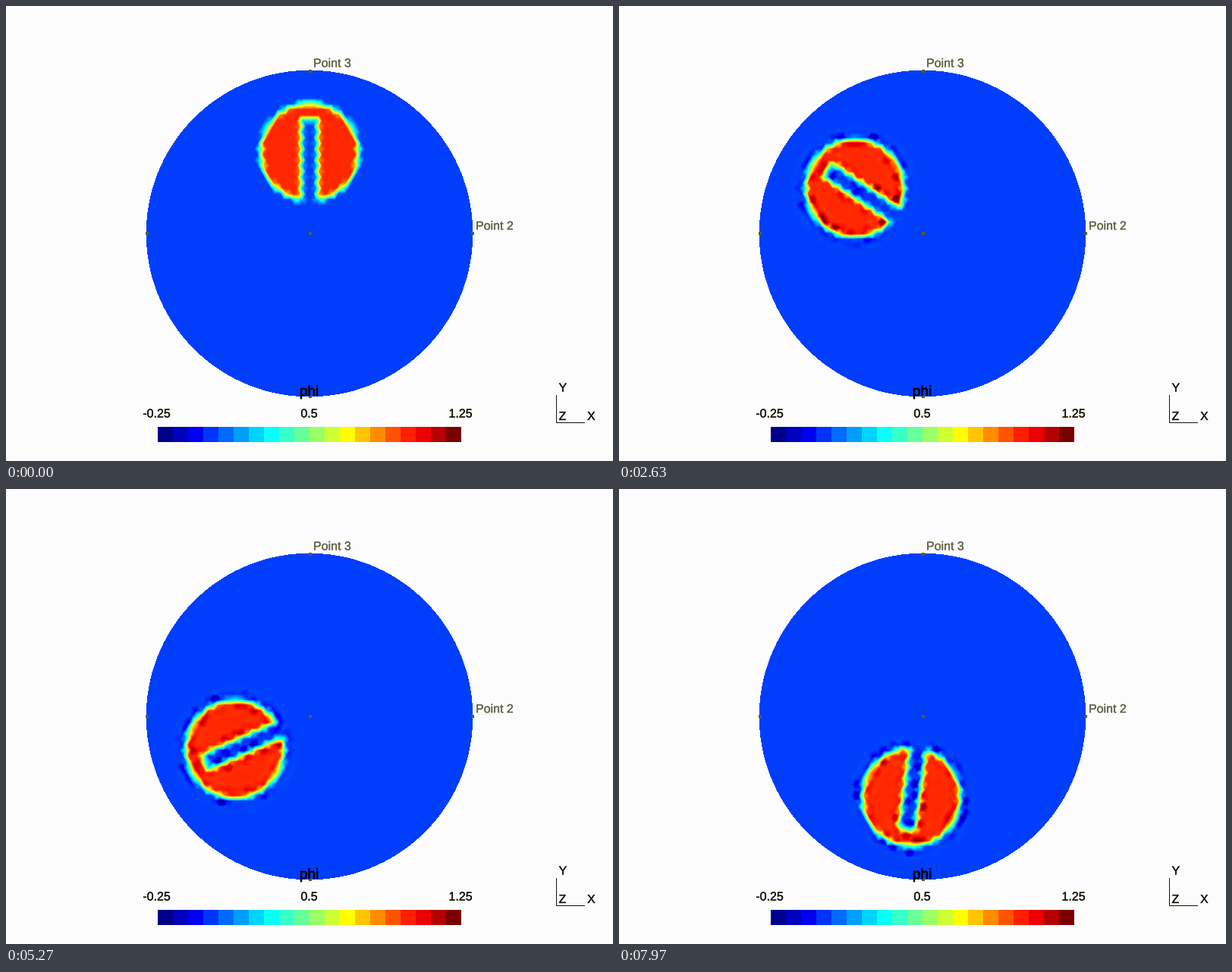
A matplotlib script that plays this animation: 800x600 px, repeating every 8000 ms.

```python
import numpy as np
import matplotlib.pyplot as plt
from matplotlib.animation import FuncAnimation
from matplotlib.patches import Circle, Rectangle
from matplotlib.patheffects import withStroke

W, H, DPI = 800, 600, 100
FRAMES, LOOP_MS = 240, 8000
STEP = 2 * np.pi / 500            # rotation per frame
CX, CY, R = 400, 300, 214.7       # domain circle
X0, X1, Y0, Y1 = 208, 480, 112, 488   # pixels the disc can reach
CELL = 0.04 * R                   # mesh edge length
ROW = CELL * np.sqrt(3) / 2
PT = 72 / DPI                     # points per pixel

# Colour scale over -0.25 .. 1.25
STOPS = [0, .11, 1 / 6, .36, .5, .63, 5 / 6, .885, 1]
RED = [0, 0, 0, 0, 128, 255, 255, 248, 122]
GREEN = [0, 0, 62, 255, 255, 255, 36, 0, 0]
BLUE = [138, 245, 252, 255, 128, 0, 0, 0, 0]


def ramp(s):
    return np.stack([np.interp(s, STOPS, c) for c in (RED, GREEN, BLUE)], -1)


LUT = ramp(np.linspace(0, 1, 512)).round().astype(np.uint8)


def colour(phi):
    idx = np.clip((phi + 0.25) / 1.5 * 511, 0, 511)
    return LUT[idx.astype(int)]


# Triangular mesh in skewed coordinates: x = CELL (a + b/2), y = ROW b
A = np.arange(-38, 26)
B = np.arange(-28, 29)
GA, GB = np.meshgrid(A, B)


def to_xy(a, b):
    return CELL * (a + b / 2), ROW * b


def hat_samples(n=4):
    """Offsets and weights of the linear hat function of one node."""
    p, q = np.meshgrid(np.arange(-n, n + 1) / n, np.arange(-n, n + 1) / n)
    w = 1 - np.maximum(np.maximum(abs(p), abs(q)), abs(p + q))
    keep = w > 1e-9
    return p[keep], q[keep], w[keep] / w[keep].sum()


HP, HQ, HW = hat_samples()
NODE_XY = to_xy(GA, GB)
SAMPLE_XY = to_xy(GA[..., None] + HP, GB[..., None] + HQ)

# Uneven over- and undershoot from node to node
SPILL = 2.5 * np.random.default_rng(4).random(GA.shape) ** 3


def distance(xy, angle):
    """Signed distance to the rotated slotted disc, positive inside."""
    x, y = xy
    c, s = np.cos(angle), np.sin(angle)
    u, v = x * c + y * s, y * c - x * s
    disc = 0.3 * R - np.hypot(u, v - 0.5 * R)
    slot = np.minimum(0.05 * R - abs(u), 0.7 * R - v)
    return np.minimum(disc, -slot)


def mass(f):
    out = f / 2
    for db, da in ((0, 1), (1, 0), (1, -1)):
        out += (np.roll(f, (db, da), (0, 1)) + np.roll(f, (-db, -da), (0, 1))) / 12
    return out


def nodal_field(k):
    angle = k * STEP
    sampled = np.clip(distance(NODE_XY, angle) / (0.7 * CELL) + 0.5, 0, 1)
    load = np.clip(distance(SAMPLE_XY, angle) / 2 + 0.5, 0, 1) @ HW
    f = load.copy()
    for _ in range(2):
        f += 1.1 * (load - mass(f))
    inner = np.clip(f, 0, 1)
    f = inner + SPILL * (f - inner)
    return sampled + min(1, k / 20) * (f - sampled)


def pixel_weights():
    """Corner indices and barycentric weights of each pixel's triangle."""
    px, py = np.meshgrid(np.arange(X0, X1) + 0.5, np.arange(Y0, Y1) + 0.5)
    b = (CY - py) / ROW
    a = (px - CX) / CELL - b / 2
    ia, ib = np.floor(a).astype(int), np.floor(b).astype(int)
    fa, fb = a - ia, b - ib
    low = fa + fb < 1
    base = (ib - B[0]) * len(A) + ia - A[0]
    corner = np.where(low, base, base + len(A) + 1)
    wc = abs(1 - fa - fb)
    wa = np.where(low, fa, 1 - fb)
    wb = np.where(low, fb, 1 - fa)
    return (corner, base + 1, base + len(A)), (wc, wa, wb)


CORNERS, WEIGHTS = pixel_weights()


def picture(k):
    f = nodal_field(k).ravel()
    return colour(sum(w * f[i] for i, w in zip(CORNERS, WEIGHTS)))


fig = plt.figure(figsize=(W / DPI, H / DPI), dpi=DPI, facecolor="#fcfcfc")
ax = fig.add_axes([0, 0, 1, 1])
ax.axis("off")


def label(x, y, text, color="#141404", size=16, ha="left", weight=0.3):
    ax.text(x, y, text, color=color, fontsize=size * PT, ha=ha,
            va="baseline", family="Liberation Sans", zorder=6,
            path_effects=[withStroke(linewidth=weight * PT, foreground=color)])


domain = Circle((CX, CY), R, fc=LUT[int(511 / 6)] / 255, ec="none",
                antialiased=False, zorder=1)
ax.add_patch(domain)
image = ax.imshow(picture(0), extent=(X0, X1, Y1, Y0), interpolation="nearest",
                  aspect="auto", zorder=2)
image.set_clip_path(domain)

# Geometry points
OLIVE = "#646448"
ax.plot([400.5, 400.5, 400.5, 185.5, 614.5], [299.5, 85.5, 514.5, 299.5, 299.5],
        "s", ms=5 * PT, color="#5a5a38", mew=0, zorder=5)
label(405, 80.5, "Point 3", OLIVE)
label(619, 295, "Point 2", OLIVE)

# Colour bar
for i in range(20):
    ax.add_patch(Rectangle((200 + 20 * i, 555), 20, 20, lw=0, antialiased=False,
                           fc=ramp(i / 19) / 255, zorder=4))
label(399.5, 514, "phi", "#000008", 19, "center", 0.8)
for x, text in ((198.5, "-0.25"), (399.5, "0.5"), (599, "1.25")):
    label(x, 542.5, text, ha="center")

# Axis triad
ax.plot([724.5, 724.5, 762], [513, 548.5, 548.5], color="#101010", lw=PT, zorder=4)
for x, y, text in ((728.5, 508.5, "Y"), (728.5, 546, "Z"), (766, 546, "X")):
    label(x, y, text)

ax.set_xlim(0, W)
ax.set_ylim(H, 0)


def update(k):
    image.set_data(picture(k))
    return (image,)


anim = FuncAnimation(fig, update, frames=FRAMES, interval=LOOP_MS / FRAMES,
                     repeat=True, repeat_delay=0, blit=False)
plt.show()
```
